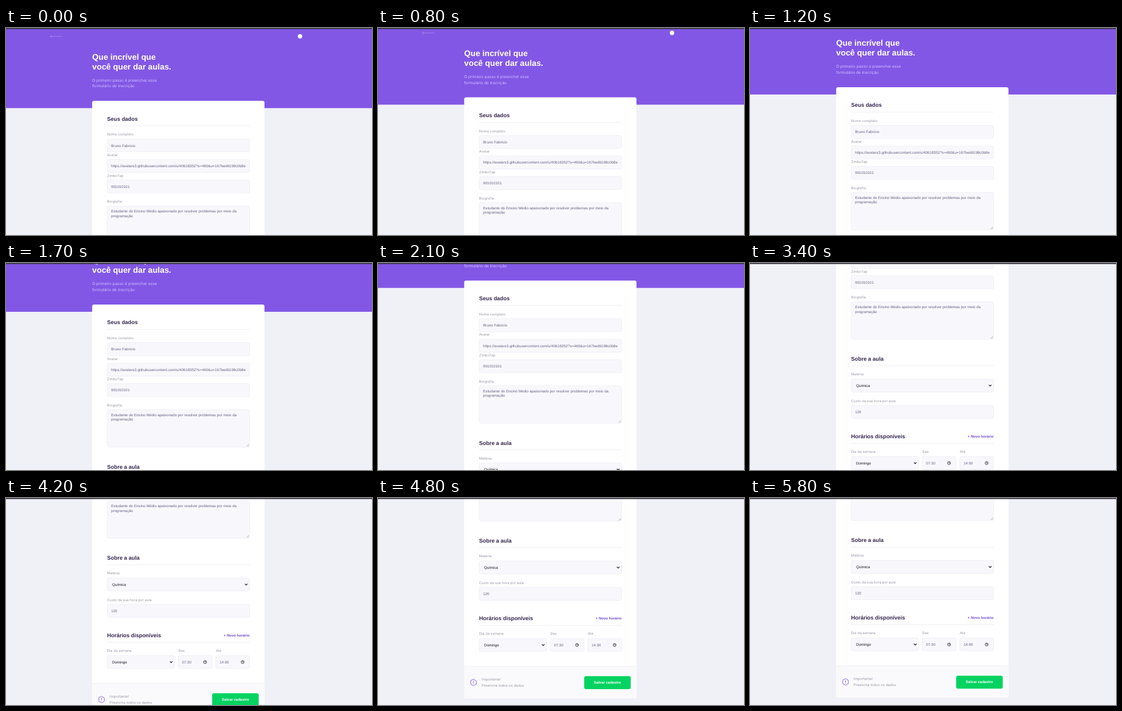
Write an HTML page that moves like this. It is 600 px wide and 339 px high and loops after 6000 ms.

```html
<!DOCTYPE html>
<html lang="pt">
<head>
<meta charset="utf-8">
<title>Formulário</title>
<style>
  html, body { margin: 0; width: 100%; height: 100%; overflow: hidden; background: #f0f0f7; }
  svg { display: block; width: 100%; height: 100%; }
  text { text-rendering: geometricPrecision; }
  .title { font: bold 13.4px "Liberation Sans", Arial, sans-serif; fill: #fff; }
  .intro { font: 6.42px Inter, sans-serif; fill: #d4c2ff; }
  .head { font: bold 8.95px "Liberation Sans", Arial, sans-serif; fill: #32264d; }
  .label { font: 5.75px Inter, sans-serif; fill: #9c98a6; }
  .value { font: 6.1px "Liberation Sans", Arial, sans-serif; fill: #6a6180; }
  .pick { font: 6.1px "Liberation Sans", Arial, sans-serif; fill: #17131f; }
  .strong { font: bold 6px "Liberation Sans", Arial, sans-serif; }
  .line { fill: none; stroke-linecap: round; stroke-linejoin: round; }
</style>
</head>
<body>
<svg viewBox="0 0 600 339" preserveAspectRatio="none">
  <rect width="600" height="339" fill="#f0f0f7"/>
  <g id="page"></g>
  <rect width="600" height="1.7" fill="#3a3540"/>
</svg>
<script>
const text = (cls, x, y, str, extra = "") =>
  `<text class="${cls}" x="${x}" y="${y}" ${extra}>${str}</text>`;

const box = (x, y, w, h = 21.1) =>
  `<rect x="${x}" y="${y}" width="${w}" height="${h}" rx="3" fill="#f8f8fc" stroke="#e6e6f0" stroke-width=".6"/>`;

const path = (d, color, width) =>
  `<path class="line" d="${d}" stroke="${color}" stroke-width="${width}"/>`;

const label = (x, y, str) => text("label", x, y, str);

// Section heading with its rule, y being the baseline
const section = (y, str) =>
  text("head", 165.8, y, str) + path(`M166 ${y + 8.3}H399.3`, "#e6e6f0", .6);

const input = (y, name, value) =>
  label(165.8, y - 5.5, name) + box(166, y, 233.3) + text("value", 172.3, y + 12.7, value);

const select = (y, w, name, value) =>
  label(165.8, y - 5.8, name) + box(166, y, w) + text("pick", 174, y + 12.7, value) +
  path(`M${160.4 + w - 1.8} ${y + 9.7}l1.8 1.9l1.8 -1.9`, "#17131f", 1.1);

const time = (x, name, value) =>
  label(x, 539.3, name) + box(x, 545.1, 55.3) + text("value", x + 6.2, 557.8, value) +
  `<circle cx="${x + 43.9}" cy="555.7" r="2.4" fill="none" stroke="#17131f" stroke-width=".8"/>` +
  path(`M${x + 43.9} 554.3v1.5h1.1`, "#17131f", .6);

const page = document.getElementById("page");
page.innerHTML = [
  `<rect y="-5" width="600" height="136.2" fill="#8257e5"/>`,
  path("M91.5 13.7H72.6M75 11.6L72.6 13.7L75 15.8", "#b59af0", .6),
  `<circle cx="482" cy="13.6" r="3.6" fill="#fff"/>`,
  text("title", 141.3, 51.8, "Que incrível que"),
  text("title", 141.3, 67.6, "você quer dar aulas."),
  text("intro", 141.2, 87.7, "O primeiro passo é preencher esse"),
  text("intro", 141.2, 97.4, "formulário de inscrição"),
  `<rect x="141.3" y="119.2" width="282.4" height="523.6" rx="3" fill="#fff"/>`,

  section(151.8, "Seus dados"),
  input(181.8, "Nome completo", "Bruno Fabricio"),
  input(215.4, "Avatar", "https://avatars3.githubusercontent.com/u/40618352?s=460&amp;u=167bed6198c0b8e"),
  input(249, "ZimboTap", "901010101"),
  label(165.8, 286.2, "Biografia"),
  box(166, 291.7, 233.3, 61),
  text("value", 172.3, 302.4, "Estudante do Ensino Médio apaixonado por resolver problemas por meio da"),
  text("value", 172.3, 309.5, "programação"),
  path("M394.6 351.4L398 348M396.7 351.4L398 350.1", "#777", .5),

  section(388, "Sobre a aula"),
  select(418.1, 233.3, "Matéria", "Química"),
  input(461.2, "Custo da sua hora por aula", "120"),

  section(514.9, "Horários disponíveis"),
  text("strong", 399.3, 513.7, "+ Novo horário", `text-anchor="end" fill="#734bd1"`),
  select(545.1, 110.4, "Dia da semana", "Domingo"),
  time(282.4, "Das", "07:30"),
  time(344, "Até", "14:00"),

  `<path d="M141.3 590.7H423.7V639.8a3 3 0 0 1-3 3H144.3a3 3 0 0 1-3-3Z" fill="#fafafc"/>`,
  path("M141.3 590.7H423.7", "#e6e6f0", .6),
  path("M156.6 611.8l4.6 2.6v5.4l-4.6 2.6l-4.6-2.6v-5.4ZM156.6 614.8v2.6M156.6 619.3v.1", "#8257e5", .9),
  label(170.1, 614.3, "Importante!"),
  label(170.1, 623.5, "Preencha todos os dados"),
  `<rect x="338" y="606.7" width="76.3" height="21.3" rx="3" fill="#04d361"/>`,
  text("strong", 376.2, 619.3, "Salvar cadastro", `text-anchor="middle" fill="#fff"`),
].join("");

// Scroll positions as [ms, px], joined by a smooth curve
const stops = [[500, 0], [1200, 22.3], [1700, 51.3], [2600, 144], [3400, 228], [4200, 287], [4900, 315.8]];
const last = stops.length - 1;

function slope(i) {
  if (i === 0 || i === last) return 0;
  const [a, b] = [stops[i - 1], stops[i + 1]];
  return (b[1] - a[1]) / (b[0] - a[0]);
}

function scrollAt(t) {
  if (t <= stops[0][0]) return 0;
  if (t >= stops[last][0]) return stops[last][1];
  const i = stops.findIndex(s => s[0] > t) - 1;
  const [t0, y0] = stops[i], [t1, y1] = stops[i + 1];
  const d = t1 - t0, u = (t - t0) / d, v = 1 - u;
  return v * v * (1 + 2 * u) * y0 + u * u * (3 - 2 * u) * y1 +
    d * u * v * (v * slope(i) - u * slope(i + 1));
}

function draw(now) {
  const t = Math.floor(now % 6000 / 100) * 100;
  page.setAttribute("transform", `translate(0 ${-scrollAt(t).toFixed(2)})`);
  requestAnimationFrame(draw);
}
draw(performance.now());
</script>
</body>
</html>
```
